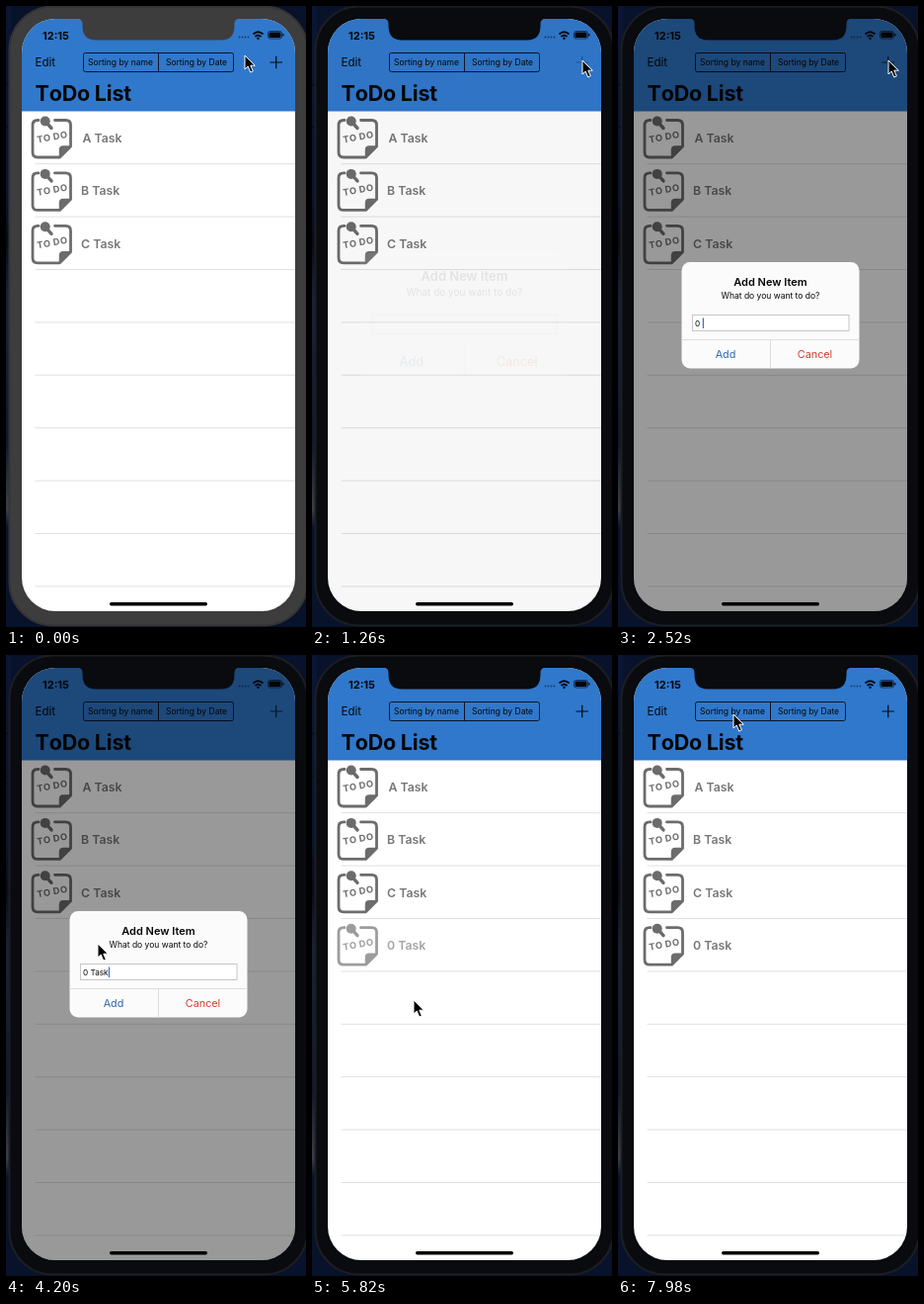
An HTML page for the animation above (8 s loop, 304 by 628 pixels).

```html
<!DOCTYPE html>
<html lang="en">
<head>
<meta charset="utf-8">
<title>ToDo List</title>
<style>
  html, body { margin: 0; width: 100%; height: 100%; overflow: hidden; background: #08122b; }
  svg { display: block; width: 304px; height: 628px; --bezel: #3d3d3e; --rim: #343436; }
  text { font-family: Inter, Roboto, sans-serif; fill: #050608; white-space: pre; }
  .bezel { fill: var(--bezel); }
  .mid { text-anchor: middle; }
  .line { stroke: #e1e1e3; }
</style>
</head>
<body>
<svg id="stage" viewBox="0 0 304 628">
  <defs>
    <linearGradient id="desk" x2="0" y2="1">
      <stop offset="0" stop-color="#0a1734"/>
      <stop offset=".3" stop-color="#0a1530"/>
      <stop offset=".38" stop-color="#080c18"/>
      <stop offset=".47" stop-color="#1a2336"/>
      <stop offset=".7" stop-color="#10182a"/>
      <stop offset=".81" stop-color="#3b3f48"/>
      <stop offset=".84" stop-color="#09132c"/>
      <stop offset="1" stop-color="#08122b"/>
    </linearGradient>
    <clipPath id="screen"><rect x="16" y="13" width="277" height="599" rx="34"/></clipPath>
    <g id="note" fill="none" stroke="#6c6c6c" stroke-width="2.800" stroke-linejoin="round" stroke-linecap="round">
      <path d="M33 115.500H32Q27 115.500 27 120.500V148Q27 153 32 153H54.500L65.500 142V120.500Q65.500 115.500 60.500 115.500H49.500"/>
      <path d="M54.500 153V145.500Q54.500 142 58 142H65.500Z" fill="#6c6c6c" stroke-width="1.500"/>
      <path d="M41 118L46 123.500" stroke-width="3.400"/>
      <circle cx="39.700" cy="116.500" r="5" fill="#6c6c6c" stroke="none"/>
    </g>
  </defs>

  <rect width="304" height="628" fill="#08122b"/>
  <rect width="5" height="628" fill="url(#desk)"/>
  <path d="M0 79.500H3M0 122.500H3M0 209.500H3" stroke="#050a18"/>
  <rect class="bezel" x="3.500" y=".5" width="302" height="626" rx="44" stroke="var(--rim)" stroke-width="2"/>

  <g clip-path="url(#screen)">
    <rect x="16" y="13" width="277" height="599" fill="#fff"/>
    <rect x="16" y="13" width="277" height="93.500" fill="#3078cb"/>
    <text x="37" y="33.500" font-size="11" font-weight="700">12:15</text>
    <g fill="#050608">
      <g opacity=".5">
        <circle cx="236.500" cy="31.500" r=".9"/><circle cx="239.500" cy="31.500" r=".9"/>
        <circle cx="242.500" cy="31.500" r=".9"/><circle cx="245.500" cy="31.500" r=".9"/>
      </g>
      <path d="M250.500 28.500Q255.500 24 260.500 28.500M252.500 31Q255.500 28.300 258.500 31"
        fill="none" stroke="#050608" stroke-width="1.700"/>
      <circle cx="255.500" cy="32.700" r="1.200"/>
      <rect x="265.500" y="25.500" width="14" height="7.500" rx="2" fill="none" stroke="#0a234a" stroke-width=".8"/>
      <rect x="266.500" y="26.500" width="12" height="5.500" rx="1.200"/>
      <rect x="280.300" y="28" width="1.200" height="2.500" rx=".6"/>
    </g>
    <text x="29.500" y="61.300" font-size="11.500">Edit</text>
    <rect x="78.500" y="47.500" width="152" height="19" rx="2" fill="none" stroke="#08152a"/>
    <path d="M154.500 47.500V66.500" stroke="#08152a"/>
    <text class="mid" x="116" y="60" font-size="8.500">Sorting by name</text>
    <text class="mid" x="193" y="60" font-size="8.500">Sorting by Date</text>
    <path id="plus" d="M267.500 57H280M273.750 50.800V63.200" stroke="#050608" stroke-width="1.200"/>
    <text x="29.500" y="96" font-size="21.500" font-weight="700" letter-spacing="-.2" style="font-kerning:none">ToDo List</text>
    <g id="list"></g>
    <rect id="dim" x="16" y="13" width="277" height="599" fill="#000"/>

    <g id="alert">
      <rect x="64.500" y="259" width="180" height="107.500" rx="8.500" fill="#fbfbfb"/>
      <text class="mid" x="154.500" y="283" font-size="11" font-weight="600">Add New Item</text>
      <text class="mid" x="154.500" y="296" font-size="8.500">What do you want to do?</text>
      <rect id="field" x="75.500" y="312.500" width="158.500" height="16" fill="#fff"/>
      <text id="entry" x="78" y="323.700" font-size="8.200"></text>
      <rect id="caret" y="315.500" width="1.200" height="10.500" fill="#2f6fd6"/>
      <path d="M64.500 337.500H244.500M154.500 337.500V366.500" stroke="#dedee0"/>
      <g id="buttons">
        <text class="mid" x="109" y="356" font-size="10.800" style="fill:#2f66ab">Add</text>
        <text class="mid" x="199.500" y="356" font-size="10.800" style="fill:#d63a32">Cancel</text>
      </g>
    </g>
  </g>

  <path class="bezel" d="M72 12.500Q77.500 13 77.500 18V20Q77.500 34.500 91 34.500H218Q231.500 34.500 231.500 20V18Q231.500 13 237 12.500Z"/>
  <rect x="105" y="602.900" width="99" height="3.500" rx="1.700" fill="#000"/>
  <path id="pointer" d="M0 0V14L3.200 11L5.700 17L8.300 15.900L5.800 10.200H10.300Z" fill="#000" stroke="#fff" stroke-width="1"/>
</svg>
<script>
const LOOP = 8000, STEP = 60, ROW = 53.4;
const CLICK_PLUS = 1080, CLICK_ADD = 5280;
const el = id => document.getElementById(id);

// Each track is a list of [time, value, ...] with linear travel between entries.
const tracks = {
  alpha: [[1200, 0], [1260, .08], [1320, .6], [1380, .94], [1440, 1],
          [5400, 1], [5460, .85], [5520, .6], [5580, .32], [5640, .12], [5700, 0]],
  scale: [[1200, 1.2], [1260, 1.18], [1320, 1.09], [1380, 1.03], [1440, 1.01], [1500, 1]],
  plus: [[1080, 1], [1140, .3], [1380, .3], [1560, .75], [5400, .75], [5700, 1]],
  newRow: [[5700, 0], [5880, 1]]
};
const moves = [[180, 242, 50], [840, 274, 55], [3540, 274, 55], [4140, 93, 292],
               [4560, 93, 292], [5040, 103, 349], [6960, 103, 349], [7740, 117, 60]];
const keys = [2100, 2400, 2700, 2940, 3120, 3300];
const entryText = "0 Task";

const ease = p => p * p * (3 - 2 * p);

function sample(track, t, curve = p => p) {
  const next = track.findIndex(k => k[0] > t);
  if (next === 0) return track[0].slice(1);
  if (next < 0) return track[track.length - 1].slice(1);
  const [a, b] = [track[next - 1], track[next]];
  const p = curve((t - a[0]) / (b[0] - a[0]));
  return a.slice(1).map((v, i) => v + (b[i + 1] - v) * p);
}

function row(name, i) {
  return `<g id="row${i}" transform="translate(0 ${i * ROW})">
    <use href="#note"/>
    <g font-weight="700" font-size="9.300" letter-spacing=".6">
      <text transform="translate(32 138.500) rotate(-10)" style="fill:#6c6c6c">TO</text>
      <text transform="translate(48.300 135.500) rotate(-10)" style="fill:#6c6c6c">DO</text>
    </g>
    <text x="${i ? 76 : 77.5}" y="138" font-size="12.300" font-weight="600" style="fill:#777">${name}</text>
  </g>`;
}

const lines = Array.from({ length: 9 }, (_, i) =>
  `<path class="line" d="M29.500 ${159.7 + i * ROW}H293"/>`);
el("list").innerHTML = lines.join("") + ["A Task", "B Task", "C Task", "0 Task"].map(row).join("");

function render(t) {
  const [alpha] = sample(tracks.alpha, t);
  const [scale] = sample(tracks.scale, t);
  const typed = keys.filter(k => k <= t).length;
  const active = t >= CLICK_PLUS;
  const pressed = t >= CLICK_ADD;

  el("stage").style.setProperty("--bezel", active ? "#0a0b0f" : "#3d3d3e");
  el("stage").style.setProperty("--rim", active ? "#1d1e22" : "#343436");
  el("dim").setAttribute("opacity", alpha * .4);
  el("alert").setAttribute("opacity", alpha);
  el("alert").setAttribute("transform",
    `translate(154.5 312.5) scale(${scale}) translate(-154.5 -312.5)`);
  el("plus").setAttribute("opacity", sample(tracks.plus, t)[0]);
  el("row3").setAttribute("opacity", sample(tracks.newRow, t)[0]);
  el("buttons").setAttribute("opacity", pressed ? .5 : 1);
  el("field").setAttribute("stroke", pressed ? "#707072" : "#c6c6c8");

  const entry = el("entry");
  entry.textContent = entryText.slice(0, typed);
  const blinkOn = (t >= 2100 && t < 3600) || (t + 800) % 1000 < 600;
  el("caret").setAttribute("x", typed ? 78.3 + entry.getComputedTextLength() : 76.5);
  el("caret").setAttribute("opacity", t >= 1320 && !pressed && (t < 1500 || blinkOn) ? 1 : 0);

  el("pointer").setAttribute("transform", `translate(${sample(moves, t, ease).join(" ")})`);
}

const start = performance.now();
function tick() {
  const t = (performance.now() - start) % LOOP;
  render(Math.floor(t / STEP) * STEP);
  requestAnimationFrame(tick);
}
tick();
</script>
</body>
</html>
```
